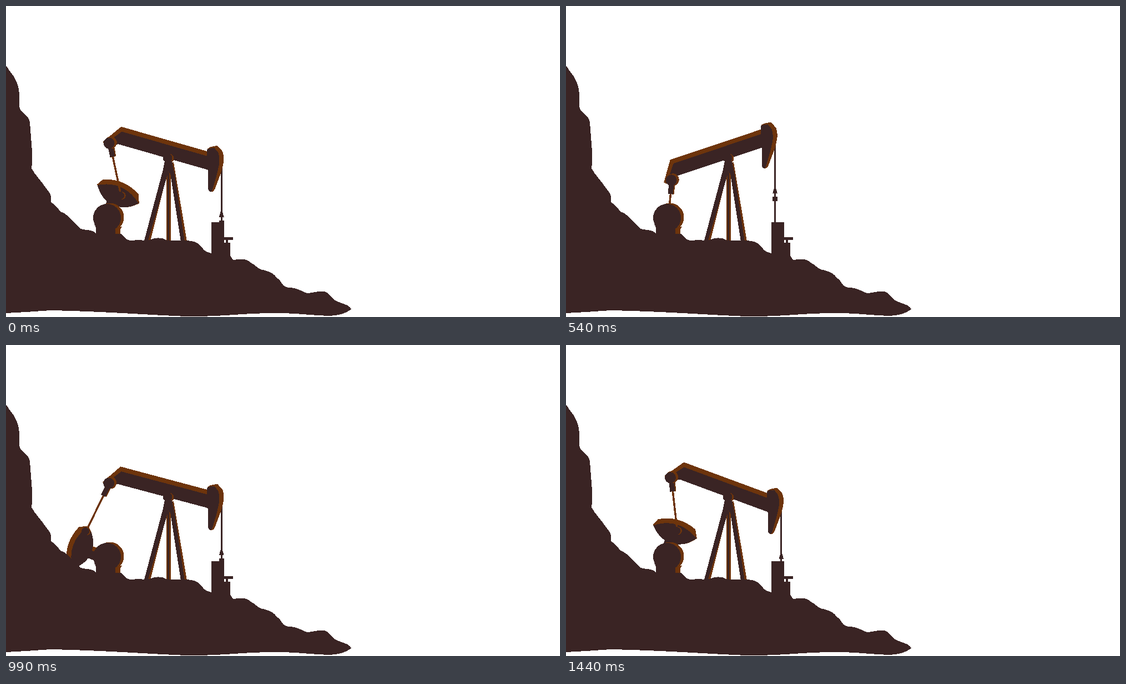
Animation of 998 by 561 pixels, one loop 1.53 s. Source, as an HTML page:

```html
<!DOCTYPE html>
<html lang="en">
<head>
<meta charset="utf-8">
<title>Pumpjack</title>
<style>
  html, body { margin: 0; width: 100%; height: 100%; overflow: hidden; background: #fff; }
  svg { display: block; width: 100vw; height: 100vh; shape-rendering: crispEdges; }
  .d { fill: #3a2424; }
  .b { fill: #6d340c; }
  .ds { stroke: #3a2424; }
  .bs { stroke: #6d340c; }
</style>
</head>
<body>
<svg viewBox="0 0 998 561" preserveAspectRatio="none">
  <line id="rope" class="ds" stroke-width="3"/>
  <g id="clamp" class="d">
    <path d="M-1.5 0H1.5L4.5 10.5H-4.5Z"/>
    <rect x="-4.5" y="16.5" width="9" height="8"/>
  </g>

  <g id="beam">
    <path class="b" d="M-99.5-35.2L-123.5 0L-120 4L-106 0L-95-3.5H76V-35.2Z"/>
    <path class="d" d="M-96-27L-119 3L-106 0L-95-3.5H76V-27Z"/>
  </g>
  <g id="head">
    <path class="b" d="M-4-20L1-23L13.5-25.5L23-15Q26-5 25 2Q23 17 18 29L9 53Q6 59 1 58Z"/>
    <path class="d" d="M-5-18Q-3-21 8-21.5L15-13Q19-1 16 12L12 29L5 53Q3 58 1 58Q-3 56-3 52V19L-5 18Z"/>
  </g>

  <g id="crank">
    <rect class="d" x="-11" y="-44" width="16" height="44"/>
    <rect class="b" x="4" y="-44" width="8" height="44"/>
    <g transform="translate(2 -4)">
      <path class="b" d="M-41-47L-35-59Q-18-68 0-68Q18-68 35-60L42-45Q25-24 0-24Q-22-24-41-47Z"/>
      <path class="d" d="M-40-46Q0-73 41-45Q25-24 0-24Q-22-24-40-46Z"/>
    </g>
  </g>

  <line id="rod" class="bs" stroke-width="3.5"/>
  <line id="stem" class="ds" stroke-width="6"/>
  <g id="pin">
    <circle class="b" cx="1.5" r="7"/>
    <circle class="d" cx="-1" r="7"/>
  </g>
  <line id="sleeveSide" class="bs" stroke-width="9"/>
  <line id="sleeve" class="ds" stroke-width="9"/>
  <g id="joint">
    <circle class="b" cx="1.5" cy="-.5" r="11"/>
    <circle class="d" cx="-1.5" cy=".5" r="10"/>
  </g>

  <g class="b">
    <circle cx="187" cy="381" r="25.5"/>
    <path d="M190 398H209Q206 401 206 405V416H190Z"/>
  </g>
  <g class="d">
    <circle cx="182" cy="382" r="25"/>
    <path d="M159 394Q163 399 162 405V420H197V403Q198 398 202 395Z"/>
  </g>

  <circle class="b" cx="294" cy="275" r="8.5"/>
  <path class="b" d="M289 290H297V425H289ZM292 296L260 424H254L284 300ZM299 282H302L326 425H318Z"/>
  <path class="d" d="M286 280H299L304 306L322 425H315L296 302L292.5 299L256 423H249L283 295Z"/>
  <rect class="d" x="291" y="300" width="2.5" height="125"/>
  <circle class="d" cx="291" cy="274" r="8.5"/>

  <path class="d" d="M370 390H393V417H409V422H400V427H404V460H370ZM393 422H396V427H393Z" fill-rule="evenodd"/>
  <path class="d" d="M0 109C2 108 3 112 5 115C18 130 24 145 24 160V182C28 196 40 194 43 210L47 262
    C48 275 47 285 46 293C52 304 63 315 74 331C80 338 82 342 81 354C88 358 93 364 98 371
    C110 374 118 387 135 402C142 405 155 402 163 411H207C215 416 215 424 227 423
    C240 421 250 424 259 422C270 417 280 417 291 423H325C352 424 350 437 361 443L372 447H402
    L409 458C420 457 432 454 441 463C450 467 455 477 467 477C478 480 484 484 488 491
    C498 495 495 507 510 508C528 508 535 518 545 518C560 516 575 510 582 521L590 529
    C600 537 618 537 622 547C610 556 598 558 583 559C545 558 520 553 470 554
    C420 555 380 561 325 560C250 557 180 551 80 549Q40 552 0 554Z"/>
</svg>
<script>
const STEP = 90, STEPS = 17;
const HUB = [180, 384], BEAM = [293.4, 279], HEAD = [293, 275], JOINT = [297, 274];
const ROD = 97, SLEEVE = 25.5, WELL_TOP = 392;

// step, beam tilt, crank angle
const keys = [
  [0, 16, 23], [4, -3.9, 119], [8, -33, 232], [10, -18.6, 260],
  [12, 48.5, 318], [14, 34.2, 360], [16, 20.3, 376], [STEPS, 16, 383]
];

const el = id => document.getElementById(id);
const set = (id, attrs) => {
  for (const name in attrs) el(id).setAttribute(name, attrs[name]);
};
const line = (id, [x1, y1], [x2, y2]) => set(id, { x1, y1, x2, y2 });
const place = (id, [x, y], turn = 0) =>
  set(id, { transform: `translate(${x} ${y}) rotate(${turn})` });
const shift = ([x, y], dx, dy = 0) => [x + dx, y + dy];
const mix = (a, b, t) => a.map((v, i) => v + (b[i] - v) * t);

// Point (x, y) of a part turned by deg about its centre.
function turned([cx, cy], deg, x, y) {
  const a = deg * Math.PI / 180, c = Math.cos(a), s = Math.sin(a);
  return [cx + x * c - y * s, cy + x * s + y * c];
}

function poseAt(step) {
  const i = keys.findIndex(k => k[0] > step);
  const a = keys[i - 1], b = keys[i];
  return mix(a, b, (step - a[0]) / (b[0] - a[0]));
}

function draw(step) {
  const [, tilt, crank] = poseAt(step);
  place('beam', BEAM, tilt);
  place('crank', HUB, crank);

  // The head follows the beam's end but stays upright; the rope hangs from it.
  const head = turned(HEAD, tilt, 72, -18.2);
  const top = shift(head, 21, 15);
  const foot = [Math.max(top[0], 376), WELL_TOP];
  place('head', head);
  line('rope', top, foot);
  place('clamp', mix(top, foot, 78 / (WELL_TOP - top[1])));

  // A rod of fixed length points from the beam's tail to the counterweight.
  const joint = turned(JOINT, tilt, -113, 4.3);
  const weight = turned(HUB, crank, 6, -53);
  const reach = Math.hypot(weight[0] - joint[0], weight[1] - joint[1]);
  const pin = mix(joint, weight, ROD / reach);
  const end = mix(joint, weight, SLEEVE / reach);
  line('rod', joint, pin);
  line('stem', pin, weight);
  line('sleeveSide', shift(joint, 2), shift(end, 1.5));
  line('sleeve', shift(joint, -0.5), shift(end, -0.5));
  place('pin', pin);
  place('joint', joint);
}

const start = performance.now();
let shown = -1;
function tick() {
  const step = Math.floor((performance.now() - start) / STEP) % STEPS;
  if (step !== shown) draw(shown = step);
  requestAnimationFrame(tick);
}
tick();
</script>
</body>
</html>
```
